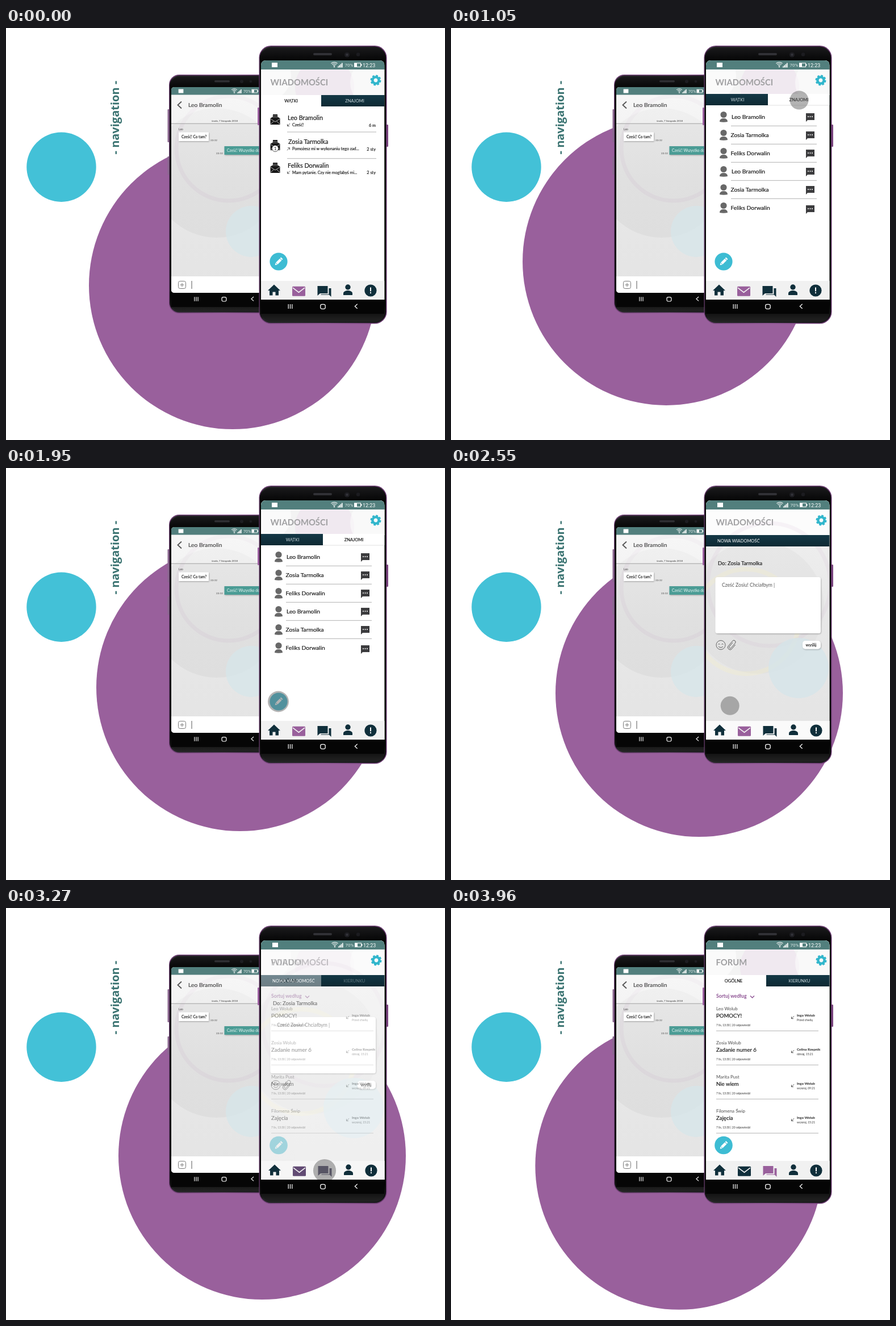
Recreate the animation shown at these times as an HTML page. Size 773 by 725 pixels, loop 3990 ms.

```html
<!DOCTYPE html>
<html lang="pl">
<head>
<meta charset="utf-8">
<title>Navigation</title>
<style>
  html, body { margin: 0; width: 100%; height: 100%; overflow: hidden; background: #fff; }
  svg { display: block; width: 773px; height: 725px; }
  text { font-family: Lato, "Open Sans", sans-serif; white-space: pre; }
</style>
</head>
<body>
<svg id="stage" viewBox="0 0 773 725" xmlns="http://www.w3.org/2000/svg"></svg>
<script>
const LOOP = 3990, STEP = 30;
const PURPLE = '#99609c', AQUA = '#43c1d7', TEAL = '#527f7d', DARK = '#102f3b', GREY = '#a0a0a2';

// ---- drawing helpers ----
const text = (x, y, size, str, fill = '#1c1c1c', more = '') =>
  `<text x="${x}" y="${y}" font-size="${size}" fill="${fill}" ${more}>${str}</text>`;
const rect = (x, y, w, h, fill, more = '') =>
  `<rect x="${x}" y="${y}" width="${w}" height="${h}" fill="${fill}" ${more}/>`;
const circle = (x, y, r, fill, more = '') =>
  `<circle cx="${x}" cy="${y}" r="${r}" fill="${fill}" ${more}/>`;
const path = (d, fill, more = '') => `<path d="${d}" fill="${fill}" ${more}/>`;
const stroke = (d, color, width = 1, more = '') =>
  path(d, 'none', `stroke="${color}" stroke-width="${width}" ${more}`);
const at = (x, y, body, scale = 1) => `<g transform="translate(${x} ${y}) scale(${scale})">${body}</g>`;
const rule = (x1, x2, y, color = '#aaa') => stroke(`M${x1} ${y}H${x2}`, color, 0.9);
const MID = 'text-anchor="middle"', END = 'text-anchor="end"', BOLD = 'font-weight="700"';
const medium = color => `stroke="${color}" stroke-width=".2"`;

// ---- icons, drawn around 0,0 ----
const home = path('M0-10 11 .5H8V9H2.5V3h-5v6H-8V.5h-3Z', DARK);
const mail = color => rect(-11.5, -8.5, 23, 17, color, 'rx="1.5"') +
  stroke('M-10.5-6 0 2 10.5-6', '#f2f2f2', 1.6);
const chat = color => path('M-12-9H6V4H-7.5L-12 8Z', color) +
  path('M8-5h4V10L8.500 6.500H-6V5.500H8Z', color);
const person = color => circle(0, -5, 4.7, color) +
  path('M-8 9V6C-8 2.500-3.500 1 0 1S8 2.500 8 6V9Z', color);
const alert = circle(0, 0, 10.6, DARK) + rect(-1, -5.5, 2, 7, '#fff') + rect(-1, 3, 2, 2, '#fff');
const gear = circle(0, 0, 5.6, 'none', 'stroke="#31b6cc" stroke-width="4.4"') +
  circle(0, 0, 8, 'none', 'stroke="#31b6cc" stroke-width="3" stroke-dasharray="3.6 2.683"');
const letter = path('M-8.500-2-4-5V-9H4v4L8.500-2V9h-17Z', '#161616') +
  stroke('M-5-6.500H5M-5-4H5', '#999', .8) + stroke('M-8-1 0 4 8-1M-8 8-2.500 3M8 8 2.500 3', '#ddd', .8);
const bust = circle(0, -3.5, 5.6, '#686868') +
  path('M-7 9C-7 4-3 3 0 3S7 4 7 9Q0 10.500-7 9Z', '#686868');
const bubble = path('M-7-7H8V5H-4L-7 8Z', '#3c3c3e') +
  [-3, .5, 4].map(x => circle(x, -1, 1, '#fff')).join('');
const arrowIn = stroke('M2.500-2.500-2 2M-2-1.500V2H1.500', '#333', .8);
const arrowOut = stroke('M-2.500 2.500 2-2M-1.500-2H2V1.500', '#333', .8);
const pencil = at(0, 0, `<g transform="rotate(45)">${
  rect(-2.3, -5.3, 4.6, 10, '#fff')}${rect(-2.3, -8.3, 4.6, 2.2, '#fff')}${path('M-2.300 5.500H2.300L0 8.800Z', '#fff')}</g>`);
const fab = (y, r) => at(480, y, circle(0, 0, r, '#3dbcd3') + pencil);

const status = (color = '#fff') => rect(-110, -4, 10, 8, color) +
  [2.5, 5, 7.5].map(r => stroke(`M${-r * .75} ${3 - r * .75}Q0 ${2.500 - r * 1.25} ${r * .75} ${3 - r * .75}`, color, 1.1)).join('') +
  circle(0, 3.2, 1.1, color) +
  [0, 1, 2, 3].map(i => rect(6 + i * 2.3, 2.5 - i * 2, 1.7, 2 + i * 2, color)).join('') +
  text(18.5, 3.4, 8, '70%', '#dde9e8', 'style="font-family:Roboto,sans-serif"') +
  rect(35.5, -3.2, 11, 6.6, 'none', `stroke="${color}"`) + rect(36, -3, 4, 6, color) +
  rect(47, -1.5, 1.5, 3, color) +
  text(50, 4.1, 9, '12:23', color, 'style="font-family:Roboto,sans-serif"');

const keys = (x, y, gap, s) => at(x - gap, y, stroke('M-3.300-4V4M0-4V4M3.300-4V4', '#fff', 1.2), s) +
  at(x, y, rect(-4.2, -3.7, 8.4, 8, 'none', 'rx="2.4" stroke="#fff" stroke-width="1.3"'), s) +
  at(x + gap + 1, y - .3, stroke('M2.200-4-2.200 0 2.200 4', '#fff', 1.2), s);

// ---- phone shells ----
const body = (x, y, w, h, rx) =>
  rect(x, y, w, h, 'url(#rim)', `rx="${rx}"`) +
  rect(x + 1.2, y + 1.6, w - 2.6, h - 3, 'url(#shell)', `rx="${rx - 1}"`) +
  rect(x + 2.5, y + 3.5, w - 5, h - 7.5, 'url(#glass)', `rx="${rx - 2}"`);

const backPhone =
  rect(284.5, 143, 3, 58, '#8b6a90', 'rx="1"') + rect(284.5, 226, 3, 32, '#8b6a90', 'rx="1"') +
  body(287, 82, 193, 420, 18) +
  rect(367, 92, 27, 3.4, '#2f2f33', 'rx="1.7"') + circle(415, 94, 3, '#1d1d22') + circle(431, 94, 2.3, '#1d1d22') +
  `<g clip-path="url(#backScreen)">` +
  rect(291, 104, 186, 362, 'url(#paper)') +
  circle(371, 255, 114, '#000', 'opacity=".035"') +
  circle(392, 212, 92, 'none', 'stroke="#b890bd" stroke-width="7" opacity=".1"') +
  circle(432, 358, 45, '#d8e6ea', 'opacity=".8"') +
  rect(291, 118, 186, 50, '#fff', 'opacity=".35"') +
  rect(291, 104, 186, 13.5, TEAL) + at(402, 111, status(), .87).replace('x="-110"', 'x="-113"') +
  stroke('M309 129.500 302.500 135.500 309 141.500', '#555', 1.8) +
  text(321, 139.3, 10.4, 'Leo Bramolin', '#484848', medium('#484848')) +
  text(362, 164.8, 4.5, 'środa, 7 listopada 2018', '#333') + rule(291, 477, 168.2, '#999') +
  text(304, 180, 5, 'Leo', '#444') +
  rect(304, 183.500, 53, 15.500, '#fff', 'filter="url(#soft)"') +
  text(309, 193.5, 6.6, 'Cześć! Co tam?', '#222', BOLD) +
  text(360, 199, 4.6, '22:32', '#444') + text(370, 222, 4.6, '22:32', '#444') +
  rect(384.5, 208, 85, 15, '#4c9c95', 'filter="url(#soft)"') +
  text(389, 217.7, 6.7, 'Cześć! Wszystko dobrze', '#eef8f6') +
  rect(291, 437, 186, 29, '#fff') +
  rect(303.500, 445.500, 13, 13, 'none', 'rx="3" stroke="#777"') +
  stroke('M310 448.500V455.500M306.500 452H313.500', '#777') + rect(326.5, 445, 1.1, 14, '#666') +
  '</g>' + rect(291, 466, 186, 25, '#060606') + keys(384, 477, 49, .93);

const frontShell =
  rect(443, 140, 3, 31, '#a063a4', 'rx="1"') + rect(669, 170, 4, 39, '#7a4480', 'rx="1.200"') +
  body(445.500, 31, 225, 489.500, 21) +
  rect(541, 44, 33, 4, '#313136', 'rx="2"') + circle(600.5, 47, 4.6, '#1e1e22') + circle(600.5, 47, 2, '#34343c') +
  circle(620, 46.5, 3.2, '#1c1c20') + rect(449, 478, 217, 25, '#050505') + keys(558, 490, 57.500, 1);

// ---- app screens ----
const screen = (dx, title, active, content, bg = '#fff', head = '#f3f3f3', foot = '#f1f1f1') =>
  rect(449, 57, 217.500, 421, bg) + rect(449, 73, 217.500, 45, head) +
  (bg === '#fff' ? `<g clip-path="url(#head)">${circle(561, 104, 52, '#d9aede', 'opacity=".15"')}${
    circle(460, 85, 42, '#fff', 'opacity=".65"')}${circle(650, 96, 44, '#fff', 'opacity=".5"')}</g>` : '') +
  content +
  rect(449, 57, 217.500, 16, TEAL) + at(578 + dx, 65, status()) +
  text(465.5 + dx, 101, 14.8, title, GREY, BOLD) +
  at(651 + dx, 92, gear, 1) +
  rect(449, 445, 217.500, 33, foot) + at(472 + dx, 461.5, home) +
  at(515.5 + dx, 463.2, mail(active === 'mail' ? PURPLE : DARK)) +
  at(560.5 + dx, 463, chat(active === 'chat' ? PURPLE : DARK)) +
  at(602 + dx, 461, person(DARK)) + at(642 + dx, 462, alert);

const tab = (x, y, w, label, cx, dark) =>
  rect(x, y, w, 20, dark ? 'url(#tab)' : '#fff') +
  text(cx, y + 12.5, 7.5, label, dark ? '#cfdcdf' : '#1c1c1c', MID + (dark ? '' : ' ' + medium('#1c1c1c')));

const threads = [
  ['Leo Bramolin', 'Cześć!', '6 m', 496, 161.5, 173, arrowIn],
  ['Zosia Tarmolka', 'Pomożesz mi w wykonaniu tego zad...', '2 sty', 497, 204, 215.3, arrowOut],
  ['Feliks Dorwalin', 'Mam pytanie. Czy nie mogłabyś mi...', '2 sty', 496, 246, 256.5, arrowIn],
].map(([name, note, when, x, y, y2, arrow], i) =>
  at(474, [161, 206, 246][i], letter) + text(x, y, 10.8, name, '#1c1c1c', medium('#1c1c1c')) +
  at(497.500, y2 - 2.5, arrow) + text(504, y2, 7.2, note, '#222', medium('#222')) +
  text(651, y2 + .500, 7.3, when, '#222', END + ' ' + medium('#222'))).join('') +
  rule(495, 652, 183) + rule(495, 652, 229.7) +
  circle(474, 212, 5.6, '#fff', 'stroke="#333" stroke-width=".8"') + text(474, 215, 8, '1', '#222', MID);

const friends = [0, 1, 2, 3, 4, 5].map(i => {
  const y = 156 + i * 32, name = ['Leo Bramolin', 'Zosia Tarmolka', 'Feliks Dorwalin'][i % 3];
  return at(480, y, bust) + text(i % 3 ? 492.5 : 494, y + 4, 10.3, name, '#1c1c1c', medium('#1c1c1c')) +
    at(632, y + (i < 5 ? 1 : 3), bubble) + (i < 5 ? rule(493, 644, y + 16.3) : '');
}).join('');

const compose =
  `<g clip-path="url(#mainBody)">` + circle(540, 245, 117, '#000', 'opacity=".025"') +
  circle(560, 205, 108, 'none', 'stroke="#c09ac4" stroke-width="7" opacity=".1"') +
  circle(520, 270, 92, 'none', 'stroke="#f4efc4" stroke-width="8" opacity=".3"') +
  circle(612, 352, 53, '#d6e5ea', 'opacity=".8"') + '</g>' +
  rect(449, 118, 217.500, 20, 'url(#tab)') + text(469, 131, 7.5, 'NOWA WIADOMOŚĆ', '#fff') +
  text(470, 171.3, 9.4, 'Do: Zosia Tarmolka', '#222', medium('#222')) +
  rect(465.500, 192, 185.500, 99, '#fff', 'rx="4" filter="url(#soft)"') +
  text(477, 209, 8.6, 'Cześć Zosiu! Chciałbym |', '#555') +
  at(475, 311.5, circle(0, 0, 8, 'none', 'stroke="#555" stroke-width=".9"') +
    stroke('M-4.500-1Q-3-3.500-1.500-1M1.500-1Q3-3.500 4.500-1M-4 2.500Q0 6.500 4 2.500', '#555', .9)) +
  at(495, 311.5, `<g transform="rotate(40)">${
    stroke('M-2 -4V5Q-2 7 0 7T2 5V-6Q2-9-1-9T-4-6V6Q-4 9.500 0 9.500T4 6V-4', '#555', .9)}</g>`) +
  rect(619, 304, 32, 14.500, '#fff', 'rx="5" filter="url(#soft)"') + text(634, 314, 7.5, 'wyślij', '#222', MID + ' ' + BOLD);

const posts = [
  ['Leo Wolub', 'POMOCY!', 'Inga Wolub', 'Przed chwilą'],
  ['Zosia Wolub', 'Zadanie numer 6', 'Celina Rzepnik', 'dzisiaj, 15:21'],
  ['Marita Pust', 'Nie wiem', 'Inga Wolub', 'wczoraj, 09:21'],
  ['Filomena Świp', 'Zajęcia', 'Inga Wolub', 'wczoraj, 15:21'],
].map(([who, topic, last, when], i) => {
  const y = 179.2 + i * 60;
  return text(467, y + .5, 8, who, '#4a4a4a') +
    text(467, y + 14, 9.6, topic, '#1c1c1c', medium('#1c1c1c')) +
    text(467, y + 28.6, 5, '7 lis, 13:30 | 20 odpowiedzi', '#333') +
    at(601.5, y + 13.5, arrowIn) + text(609, y + 11.7, 6.3, last, '#222', BOLD) +
    text(609, y + 19.8, 5, when, '#333') + rule(467, 647, y + 37);
}).join('');

const screens = [
  screen(0, 'WIADOMOŚCI', 'mail',
    tab(449, 118, 106, 'WĄTKI', 502) + tab(555, 118, 111.500, 'ZNAJOMI', 614, true) + threads + fab(411, 15.6)),
  screen(0, 'WIADOMOŚCI', 'mail',
    tab(449, 116, 109, 'WĄTKI', 504.5, true) + tab(558, 116, 108.500, 'ZNAJOMI', 612.5) + rule(558, 666, 136, '#ddd') +
    friends + fab(411, 15.6)),
  screen(1, 'WIADOMOŚCI', 'mail', compose, 'url(#paper)', '#fcfcfc', '#fafafa'),
  screen(1, 'FORUM', 'chat',
    tab(449, 118, 106, 'OGÓLNE', 497.5) + tab(555, 118, 111.500, 'KIERUNKU', 613.5, true) +
    text(467, 158.3, 8.6, 'Sortuj według', '#8d5293', BOLD) + stroke('M527 154.500 530.500 158 534 154.500', '#8d5293', 1.4) +
    posts + fab(417.500, 15.8)),
];

const gradient = (id, dir, stops) => `<linearGradient id="${id}" ${dir}>${
  stops.map(([o, c]) => `<stop offset="${o}" stop-color="${c}"/>`).join('')}</linearGradient>`;
const clip = (id, shape) => `<clipPath id="${id}">${shape}</clipPath>`;
const DOWN = 'x1="0" y1="0" x2="0" y2="1"';

document.getElementById('stage').innerHTML = `<defs>
  ${gradient('rim', '', [[0, '#6d3f73'], [.5, '#8a5590'], [1, '#6a3a70']])}
  ${gradient('shell', '', [[0, '#060606'], [.03, '#262628'], [.97, '#1a1a1c'], [1, '#050505']])}
  ${gradient('glass', DOWN, [[0, '#19191b'], [.05, '#050505'], [.94, '#050505'], [1, '#222']])}
  ${gradient('paper', DOWN, [[0, '#f1f1f1'], [.45, '#e8e8e8'], [1, '#e4e4e4']])}
  ${gradient('tab', DOWN, [[0, '#143846'], [1, '#0e2933']])}
  ${clip('backScreen', rect(291, 104, 186, 362, '#000', 'rx="5"'))}
  ${clip('frontScreen', path('M449 66Q449 57 458 57H657.500Q666.500 57 666.500 66V478H449Z', '#000'))}
  ${clip('head', rect(449, 73, 217.500, 45, '#000'))}
  ${clip('mainBody', rect(449, 73, 217.500, 372, '#000'))}
  <filter id="soft" x="-20%" y="-20%" width="140%" height="150%">
    <feDropShadow dx=".8" dy="1.2" stdDeviation="1.3" flood-opacity=".28"/></filter>
  </defs>
  ${circle(97.5, 244.7, 61.2, AQUA)}
  ${circle(0, 0, 253, PURPLE, 'id="orb"')}
  <text transform="translate(199 222.5) rotate(-90)" font-size="20" font-weight="700" fill="#3a7371"
    style="font-family:'Open Sans','Noto Sans',sans-serif">- navigation -</text>
  ${backPhone}${frontShell}
  <g clip-path="url(#frontScreen)">${screens.map(s => `<g class="screen">${s}</g>`).join('')}
  ${circle(0, 0, 16.5, '#696969', 'id="touch"')}</g>`;

// ---- motion ----
const orbPath = [ // time, x, y
  [0, 399, 453], [540, 367.5, 430], [620, 367.3, 425], [1080, 380, 410], [1530, 396, 396], [1950, 412, 386],
  [2550, 437, 396], [2700, 442.3, 404], [3270, 451, 436], [3780, 419, 453.5],
];
const taps = [[565, 613, 127], [1903, 479.5, 411], [2960, 561, 462]];
const moves = [[1200, 1900], [2400, 2960]];
const TAP = 400, FADE_DELAY = 290, FADE = 75;

const clamp = v => Math.max(0, Math.min(1, v));
const ramp = (t, a, b) => clamp((t - a) / (b - a));
const ease = u => u < .5 ? 2 * u * u : 1 - 2 * (1 - u) * (1 - u);

// Smooth closed curve through the orb's points.
function orbAt(t) {
  const n = orbPath.length;
  const knot = i => {
    const p = orbPath[(i + n) % n];
    return [p[0] + Math.floor(i / n) * LOOP, p[1], p[2]];
  };
  let i = n - 1;
  while (orbPath[i][0] > t) i--;
  const [p, a, b, q] = [knot(i - 1), knot(i), knot(i + 1), knot(i + 2)];
  const d = b[0] - a[0], u = (t - a[0]) / d, v = 1 - u;
  return [1, 2].map(k => {
    const ma = (b[k] - p[k]) / (b[0] - p[0]) * d, mb = (q[k] - a[k]) / (q[0] - a[0]) * d;
    return v * v * (1 + 2 * u) * a[k] + u * v * v * ma + u * u * (3 - 2 * u) * b[k] - u * u * v * mb;
  });
}

const set = (el, attrs) => Object.entries(attrs).forEach(([k, v]) => el.setAttribute(k, v));
const orb = document.getElementById('orb'), touch = document.getElementById('touch');
const layers = document.querySelectorAll('.screen');

function draw(t) {
  const [ox, oy] = orbAt(t);
  set(orb, { cx: ox, cy: oy });

  let [, x, y] = taps[0], r = 16.5;
  moves.forEach(([a, b], i) => {
    const u = ease(ramp(t, a, b));
    x += (taps[i + 1][1] - taps[i][1]) * u;
    y += (taps[i + 1][2] - taps[i][2]) * u;
  });
  taps.forEach(([start], i) => {
    r += 5.5 * Math.sin(Math.PI * ramp(t, start, start + TAP));
    const fadeAt = start + FADE_DELAY;
    layers[i + 1].setAttribute('opacity', ramp(t, fadeAt - 10, fadeAt - 10 + FADE));
  });
  set(touch, { cx: x, cy: y, r, opacity: .5 * ramp(t, 300, 450) * (1 - ramp(t, 3390, 3540)) });
}

const begin = performance.now();
function tick() {
  const t = (performance.now() - begin) % LOOP;
  draw(Math.floor(t / STEP) * STEP);
  requestAnimationFrame(tick);
}
draw(0);
requestAnimationFrame(tick);
</script>
</body>
</html>
```
